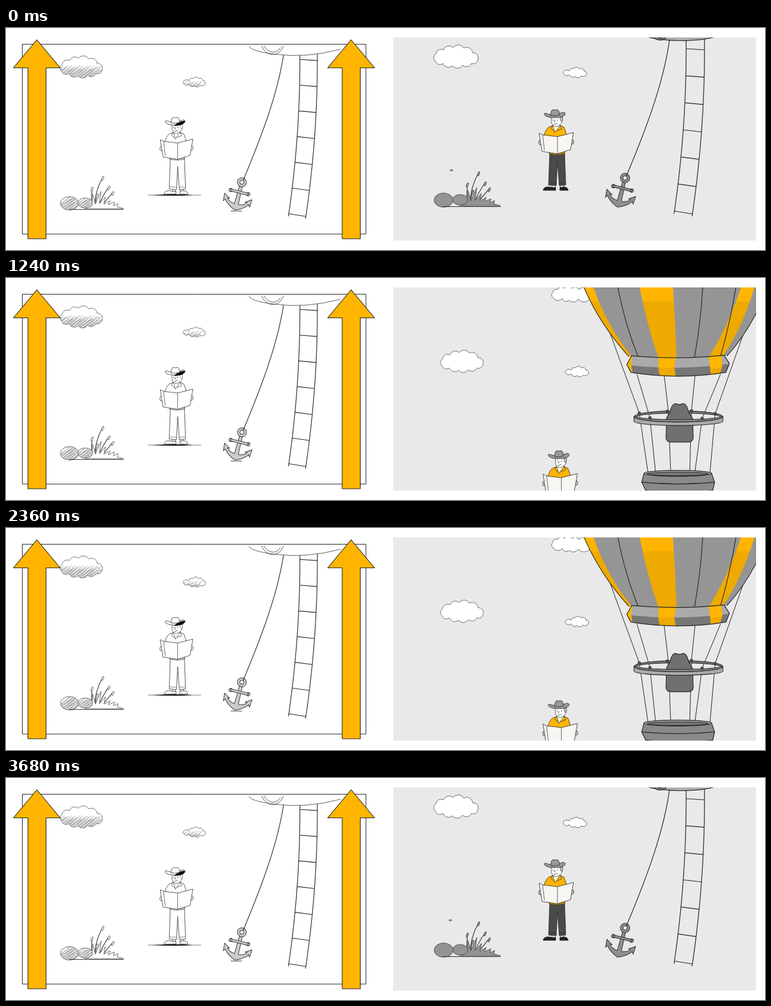
Write an HTML page with a canvas that moves like this. It is 1280 px wide and 376 px high and loops after 3720 ms.

```html
<!DOCTYPE html>
<html lang="en">
<head>
<meta charset="utf-8">
<title>Sketch and parallax scene</title>
<style>
  html, body { margin: 0; width: 100%; height: 100%; overflow: hidden; background: #fff; }
  canvas { display: block; }
</style>
</head>
<body>
<canvas id="stage" width="1280" height="376"></canvas>
<script>
const ctx = document.getElementById("stage").getContext("2d");
const INK = "#222", GOLD = "#ffb500", DEEP_GOLD = "#eeaa00", GRAY = "#959595";
const HALF = 1860, TRAVEL = 1740;
let sketch = false;

const tint = color => sketch ? "#fff" : color;

function pen(d, fill, line = INK, width = 1) {
  const path = new Path2D(d);
  if (fill) { ctx.fillStyle = fill; ctx.fill(path); }
  if (line) { ctx.strokeStyle = line; ctx.lineWidth = width; ctx.stroke(path); }
}

const oval = (x, y, rx, ry = rx) =>
  `M${x - rx} ${y}a${rx} ${ry} 0 1 1 ${2 * rx} 0a${rx} ${ry} 0 1 1 ${-2 * rx} 0Z`;

function at(x, y, draw, scale = 1, angle = 0) {
  ctx.save();
  ctx.translate(x, y);
  ctx.rotate(angle);
  ctx.scale(scale, scale);
  draw();
  ctx.restore();
}

// Hard two-tone fill that switches at height y
function split(y, top, bottom) {
  const g = ctx.createLinearGradient(0, y - .5, 0, y + .5);
  g.addColorStop(0, top);
  g.addColorStop(1, bottom);
  return g;
}

// Closed outline of round bumps between the given points
function puffs(pts) {
  let d = `M${pts[0]} ${pts[1]}`;
  for (let i = 0; i < pts.length; i += 2) {
    const x = pts[(i + 2) % pts.length], y = pts[(i + 3) % pts.length];
    const r = .6 * Math.hypot(x - pts[i], y - pts[i + 1]);
    d += `A${r} ${r} 0 0 1 ${x} ${y}`;
  }
  return d + "Z";
}

function hatch(shape, x0, x1, y, rise) {
  ctx.save();
  ctx.clip(new Path2D(shape));
  for (let x = x0, i = 0; x < x1; x += 1.8, i++)
    pen(`M${x} ${y}l${rise * 1.3} ${-rise + 4 * Math.sin(i * 2.3)}`, null, "#888", .8);
  ctx.restore();
}

const BIG_CLOUD = puffs([724,56, 725,44, 738,37, 754,33, 772,34, 787,42, 796,53, 785,60, 770,63, 753,64, 737,60]);
const SMALL_CLOUD = puffs([940,75, 950,73, 957,69, 967,69, 975,73, 979,78, 970,81, 960,82, 950,79, 940,77]);
const FAR_CLOUD = puffs([923,39, 922,30, 930,25, 942,23, 955,23, 966,25, 985,28, 985,40, 965,41, 950,43, 938,40]);

function clouds(e) {
  at(40.9 * e, 100 * e, () => {
    pen(BIG_CLOUD, "#fff", "#444", .8);
    if (sketch) hatch(BIG_CLOUD, 690, 772, 72, 22);
  }, 1 - .04 * e);
  at(3.5 * e, 88 * e, () => {
    pen(SMALL_CLOUD, "#fff", "#444", .8);
    if (sketch) hatch(SMALL_CLOUD, 932, 962, 86, 9);
  });
  if (!sketch) at(0, 98 * (e - 1), () => pen(FAR_CLOUD, "#fff", "#444", .8));
}

function man() {
  pen("M921 262h5v9h-5ZM935 262h5v9h-5Z", "#fff", INK, .7);
  pen("M906 274Q907 269 915 269L921 270H927V275H906ZM934 275V270L941 269Q948 270 948 275Z", tint("#222"), INK, .8);
  pen("M917 211L915 266L928 267L930 226L933 267L944 266L942 211Z", tint("#4a4a4a"), INK, .8);
  pen("M916 262L928 263M933 263L943 262", null, INK, .6);
  pen("M915 168L923 165H934L941 168Q945 177 946 186L942 213Q929 216 916 213V186L907 184Q909 173 915 168Z", tint(GOLD), INK, .8);
  pen("M916 211Q929 214 942 211", null, INK, .6);
  pen("M922 164L926 177L935 164Z", "#fff", INK, .7);
  pen("M922 165L919 170L925 175M935 165L937 171L929 174", null, INK, .7);
  pen("M920 150V160Q922 167 928 167Q936 165 938 158V150Z", "#fff", INK, .7);
  pen("M934 151L935 157L938 159L939 151Z", tint("#bbb"), INK, .5);
  pen(oval(923, 156, .8) + oval(930, 156, .8), INK, null);
  pen("M926 156L925 160M924 163Q927 164 930 161", null, INK, .8);
  pen("M908 147Q907 143 912 145Q925 150 938 143Q944 142 943 147Q938 152 925 152Q912 152 908 147Z", tint("#999"), INK, .8);
  if (sketch) pen("M924 153Q941 153 943 145Q934 144 924 153Z", "#000");
  pen("M918 148L920 140Q922 137 926 139Q930 137 932 140L934 147Q926 150 918 148Z", tint("#999"), INK, .8);
  pen(oval(901, 194, 2.5, 4) + oval(954.5, 193, 3, 4), tint("#ccc"), INK, .8);
  pen("M899 178L905 181L930 184L957 177L952 206L930 213L904 209Z", tint("#f8f6f2"), INK, .8);
  pen("M930 184V213M905 181L908 207", null, INK, .7);
}

function plants() {
  const big = oval(738, 291.5, 16, 12), small = oval(766, 291, 13, 9);
  const shade = tint("#949494");
  for (const [x, tx, ty] of [[782, 797, 245], [790, 808, 262], [776, 778, 264], [793, 815, 272], [781, 787, 276]]) {
    pen(`M${x} 300Q${x + 1} ${ty + 25} ${tx} ${ty}`, null, "#444", 1.3);
    at(tx, ty + 2, () => pen(oval(0, 0, 1.5, 4), shade, "#444", .8), 1, .35);
  }
  pen("M765 301L775 286L778 295L779 275L784 293L794 270L791 292L802 280L799 293L810 287L807 294L818 289L816 296L824 292L823 298L834 301Z", shade, "#444", .8);
  pen(small, shade, "#444", .9);
  pen(big, shade, "#444", .9);
  if (sketch) {
    hatch(big, 708, 752, 304, 24);
    hatch(small, 742, 778, 301, 18);
  }
  pen("M738 302.5H834", null, INK, 1);
}

function anchor() {
  const metal = sketch ? "#ccc" : "#8f8f8f";
  pen("M-2.5 7L-3.5 40Q-14 39 -18 33H-14L-25 26L-24 40L-21.5 36Q-14 46 0 51Q14 46 21.5 36L24 40L25 26L14 33H18Q14 39 3.5 40L2.5 7Z", metal, "#333");
  pen("M-16 16H16V20H-16Z" + oval(-16, 18, 3) + oval(16, 18, 3), metal, "#333");
  pen("M-15 17H15V19H-15Z", metal, null);
  pen(oval(0, 0, 8), metal, "#333");
  pen(oval(0, 0, 3.5), sketch ? "#fff" : "#e9e9e9", "#333");
}

// lift: basket travel, drop: anchor travel, bend: 0 hanging left, 1 curled right
function rigging(lift, drop, bend) {
  const rail = u => 1147 - 2 * bend - 20 * bend * u + (46 * bend - 20) * u * u;
  const height = u => 36 + 276 * u + lift;
  let d = "";
  for (const [shift, end] of [[0, 1.01], [31, 1.025]])
    for (let i = 0; i <= 20; i++) {
      const u = -.08 + i / 20 * (end + .08);
      d += `${i ? "L" : "M"}${rail(u) + shift} ${height(u)}`;
    }
  for (let k = 0; k < 7; k++) {
    const u = k / 6;
    d += `M${rail(u)} ${height(u) - 1 - u}L${rail(u) + 31} ${height(u) + 1 + 2 * u}`;
  }
  pen(d, null, INK, 1.2);
  at(1044, 254 + drop, anchor, 1, .245 - .07 * bend);
  pen(`M1119.5 ${16 + lift}C${1110 + 4 * bend} ${90 + lift} ${1080 + 5 * bend} ${170 + drop + 30 * bend} 1046 ${251 + drop}`, null, INK, 1.2);
}

function basket() {
  pen("M1076 356L1072 371L1079 385L1081 427H1192V385L1195 371L1190 356Z", "#8a8a8a", INK, 1.2);
  pen(oval(1133, 356, 57, 5), "#aaa", INK, 1.2);
  pen(oval(1133, 357, 52, 3), "#777", INK, 1);
  pen("M1072 371Q1134 377 1195 371M1079 385Q1134 390 1191 385M1081 413H1191", null, INK, 1.2);
  pen("M1079 423Q1135 429 1194 423L1209 479Q1200 494 1137 494.5Q1076 493 1066 479Z", "#b0b0b0", INK, 1.2);
  pen("M1101 439H1110V457H1101Z", "#777", INK, 1.2);
  pen(oval(1103, 471, 15.5, 20.5), null, INK, 5);
  pen(oval(1103, 471, 15.5, 20.5), null, "#808080", 2.6);
}

function balloon() {
  pen("M1017 114L1068 254L1083 357M1064 188L1086 262L1096 360M1110 191L1117 251L1121 355M1162 190L1156 250L1153 355M1205 188L1174 263L1161 360M1246 113L1196 255L1187 357", null, INK, 1);
  pen("M960 0Q985 85 1050 158Q1134 163 1216 157Q1268 100 1300 0Z", GRAY, null);
  const stripe = split(65, GOLD, DEEP_GOLD);
  pen("M960 0Q985 85 1050 158L1056 159Q1003 95 978 0Z", stripe, null);
  pen("M1062 0Q1075 90 1101 162H1131Q1128 80 1122 0Z", stripe, null);
  pen("M1252 0Q1226 95 1184 161L1207 160Q1250 100 1273 0Z", stripe, null);
  pen("M960 0Q985 85 1050 158M1216 157Q1268 100 1300 0M1025 0Q1038 90 1066 158M1177 0Q1174 90 1161 160M1235 16Q1222 100 1205 157", null, INK, 1.1);

  const collar = "M1055 157Q1134 164 1211 156L1220 170L1214 185Q1134 198 1054 185L1047 172Z";
  pen(collar, "#aaa", null);
  ctx.save();
  ctx.clip(new Path2D(collar));
  pen("M1040 172Q1134 183 1225 170V200H1040Z", "#777", null);
  const band = split(177, GOLD, DEEP_GOLD);
  pen("M1040 150H1058L1054 172L1059 195H1040ZM1101 150H1131L1127 177L1131 200H1104L1100 177ZM1184 150H1206L1208 174L1202 195H1189L1187 175Z", band, null);
  ctx.restore();
  pen(collar, null, INK, 1.2);

  pen("M1059 260A75 10 0 0 1 1209 260H1204A70 6 0 0 0 1064 260Z", "#777", INK);
  pen("M1114 262L1120 252Q1123 237 1130 238Q1136 241 1141 238Q1148 237 1151 252L1158 263L1159 296Q1158 303 1150 303H1122Q1114 303 1113 296Z", "#707070", INK, 1.1);
  pen("M1059 260A75 9 0 0 0 1209 260V268A75 7 0 0 1 1059 268Z", "#aaa", INK, 1.1);
  pen("M1059 260A75 9 0 0 0 1209 260H1204A70 5 0 0 1 1064 260Z", "#888", INK, 1);
  for (const [x, y] of [[1068, 254], [1086, 262], [1115, 251], [1156, 250], [1174, 263], [1196, 255]])
    pen(oval(x, y, 2.3), "#555", INK, .8);
  basket();
}

function drawing() {
  sketch = true;
  pen("M27.5 27.5H607V349H27.5Z", "#fff", "#222", 1);
  ctx.save();
  ctx.translate(-594, 20);
  ctx.scale(.95, .95);
  clouds(0);
  plants();
  man();
  rigging(0, 0, 0);
  ctx.restore();
  pen("M410 29Q413 39 450 44Q505 52 564 36V29Z", "#fff", null);
  pen("M410 31Q413 39 450 44Q505 52 564 36M431 30Q437 45 451 45Q463 44 468 30M435 30Q441 41 451 41Q459 40 463 33", null, "#333", .8);
  pen("M239 283H329", null, INK, .6);
  pen("M246 283Q285 280 316 283Q285 285 246 283Z", "#111", null);
  pen("M379 310H398", null, INK, .9);
  for (const x of [52, 582])
    at(x, 20, () => pen("M0 0L39.5 47.5H15.5V337H-15V47.5H-39.5Z", GOLD, "#222", 1.1));
}

function scene(e, time) {
  sketch = false;
  ctx.save();
  ctx.beginPath();
  ctx.rect(653, 16, 612, 344);
  ctx.fillStyle = "#e9e9e9";
  ctx.fill();
  ctx.clip();
  const slack = Math.exp(-30 * e), climb = 465 * e;
  clouds(e);
  rigging(climb + 8 * (1 - slack), climb, 1 - slack);
  at(0, climb - 465 - 8 * slack, balloon);
  at(7 * e, 163 * e, man);
  at(16 * e, 490 * e, () => {
    plants();
    const a = time / HALF * 2 * Math.PI, x = 751 + 14 * Math.sin(a), y = 234 + 7 * Math.cos(a);
    pen(oval(x - 1, y, 1.2) + oval(x + 1.5, y, 1.2), "#999", "#555", .7);
  });
  ctx.restore();
}

const easeInOutQuart = p => p < .5 ? 8 * p ** 4 : 1 - 8 * (1 - p) ** 4;

function frame(now) {
  const time = now % (2 * HALF);
  const eased = easeInOutQuart(Math.min(1, time % HALF / TRAVEL));
  ctx.fillStyle = "#fff";
  ctx.fillRect(0, 0, 1280, 376);
  drawing();
  scene(time < HALF ? eased : 1 - eased, time);
  requestAnimationFrame(frame);
}

ctx.lineJoin = "round";
requestAnimationFrame(frame);
</script>
</body>
</html>
```
